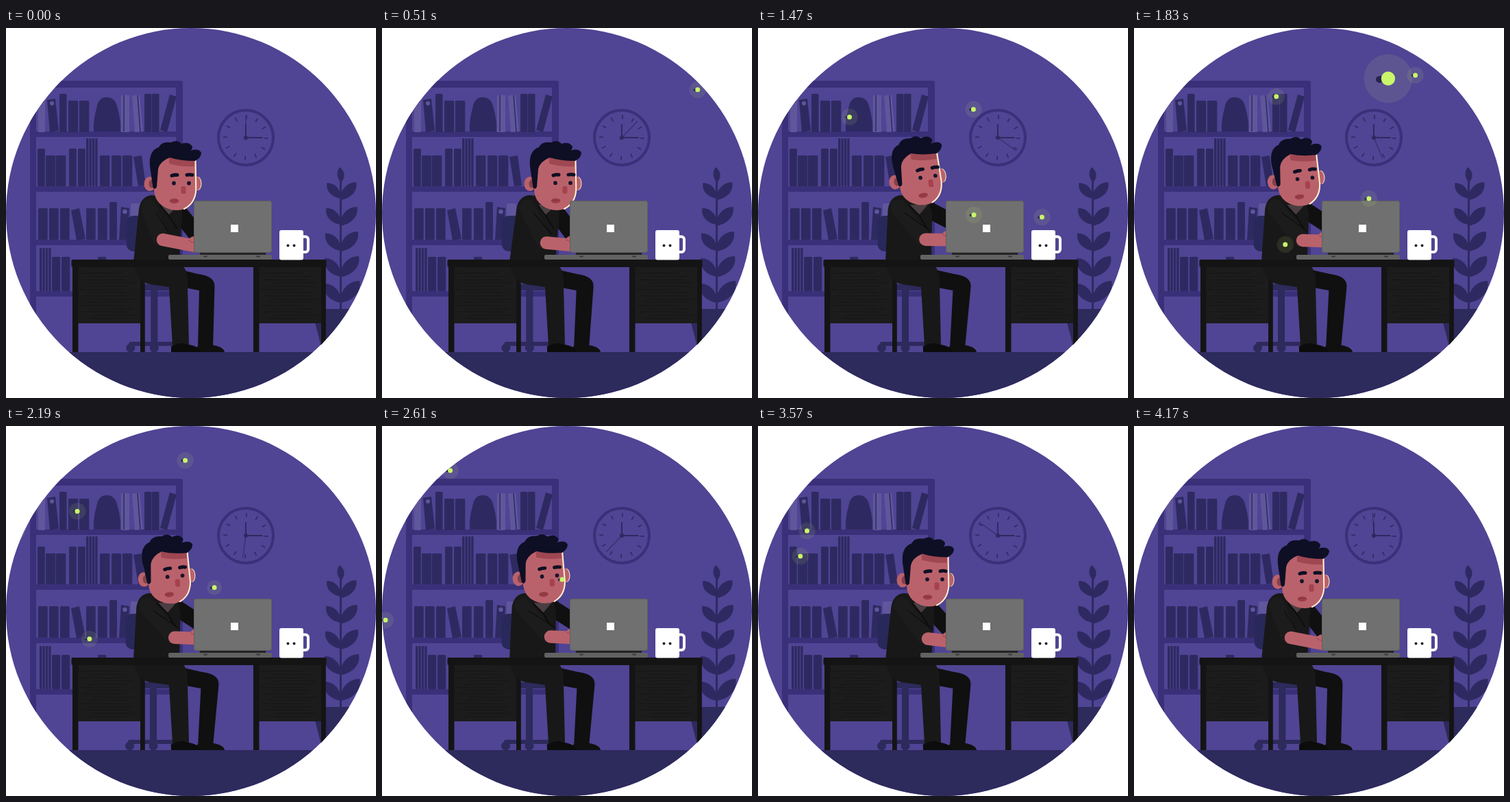
An HTML page with a canvas that plays this animation: 540x540 px, repeating every 4.2 s.

```html
<!DOCTYPE html>
<html lang="en">
<head>
<meta charset="utf-8">
<title>Night shift</title>
<style>
html, body { margin: 0; width: 100%; height: 100%; overflow: hidden; background: #fff; }
canvas { display: block; width: 540px; height: 540px; }
</style>
</head>
<body>
<canvas id="stage" width="540" height="540"></canvas>
<script>
const ctx = document.getElementById('stage').getContext('2d');
const LOOP = 4200;
const C = {
  wall: '#504494', shelf: '#3a3079', book: '#2e2a61', pale: '#5f569b', floor: '#2d2a5c',
  desk: '#141414', panel: '#1c1c1c', cloth: '#181818', cloth2: '#101010',
  skin: '#ba626b', shade: '#9f4752', hair: '#0e0f24', rim: '#fff1d2',
  lid: '#6f706f', glow: '#c9f66a', halo: 'rgba(205,235,120,0.1)'
};

// Drawing helpers
function rect(x, y, w, h, color, r = 0) {
  ctx.fillStyle = color;
  ctx.beginPath();
  ctx.roundRect(x, y, w, h, r);
  ctx.fill();
}
function oval(x, y, rx, ry, color) {
  ctx.fillStyle = color;
  ctx.beginPath();
  ctx.ellipse(x, y, rx, ry, 0, 0, Math.PI * 2);
  ctx.fill();
}
const dot = (x, y, r, color) => oval(x, y, r, r, color);
function shape(d, color) {
  ctx.fillStyle = color;
  ctx.fill(new Path2D(d));
}
function line(d, w, color, cap = 'round') {
  ctx.strokeStyle = color;
  ctx.lineWidth = w;
  ctx.lineCap = cap;
  ctx.lineJoin = 'round';
  ctx.stroke(new Path2D(d));
}

// Smooth curve through rows of [time, ...values]
function curve(keys, time) {
  const t = Math.max(keys[0][0], Math.min(keys[keys.length - 1][0], time));
  let i = 0;
  while (i < keys.length - 2 && t >= keys[i + 1][0]) i++;
  const a = keys[i], b = keys[i + 1], p = keys[i - 1] || a, n = keys[i + 2] || b;
  const span = b[0] - a[0], u = (t - a[0]) / span;
  const u2 = u * u, u3 = u2 * u;
  return a.slice(1).map((v, k) => {
    const j = k + 1;
    const m0 = (b[j] - p[j]) / (b[0] - p[0]) * span;
    const m1 = (n[j] - a[j]) / (n[0] - a[0]) * span;
    return (2 * u3 - 3 * u2 + 1) * v + (u3 - 2 * u2 + u) * m0 +
      (3 * u2 - 2 * u3) * b[j] + (u3 - u2) * m1;
  });
}

// Upright books with their foot on a shelf
function books(base, top, w, ...xs) {
  for (const x of xs) rect(x, top, w, base - top, C.book, 1.5);
}
function strips(x, top, base) {
  for (let i = 0; i < 4; i++) rect(x + i * 4.4, top, 3.4, base - top, C.book, 1);
}

function bookcase() {
  rect(35, 77, 223, 10, C.shelf, 3);
  rect(35, 80, 9, 393, C.shelf);
  rect(248, 80, 10, 393, C.shelf);
  for (const y of [151, 231, 309, 384]) rect(40, y, 212, 8, C.shelf);

  rect(47, 105, 10, 47, C.pale, 1.5);
  rect(168, 98, 12, 54, C.pale, 1.5);
  books(152, 96, 10.5, 78, 202, 213);
  books(152, 106, 14.3, 91, 107);
  shape('M60 105L72 103L77 150L64 152Z', C.book);
  dot(67, 110, 3, C.pale);
  shape('M184 99L195 97L200 151L188 152Z', C.pale);
  line('M172 98V151M192 98L196 151', 1.5, C.book, 'butt');
  shape('M239 97L249 100L235 152L225 149Z', C.book);
  shape('M128 151Q127 134 132 118Q134 101 147 101Q160 101 163 118Q168 134 167 151Z', C.book);

  books(231, 176, 10.8, 46, 92, 105);
  books(231, 186, 14.3, 58, 73, 137, 154, 170);
  strips(117, 161, 231);
  shape('M186 188L198 186L204 230L193 231Z', C.book);

  books(309, 263, 13.7, 47, 63, 79, 117, 134);
  books(309, 254, 11, 151);
  rect(182, 256, 14, 53, C.pale, 1.5);
  shape('M95 266L107 263L116 308L103 310Z', C.book);
  shape('M168 261L180 263L178 309L165 309Z', C.book);
  dot(173.5, 268, 3.2, C.pale);

  books(384, 334, 12.2, 67, 81, 134);
  strips(49, 321, 384);
}

function clock(t) {
  ctx.save();
  ctx.translate(350, 160);
  ctx.strokeStyle = C.shelf;
  ctx.lineWidth = 4;
  ctx.beginPath();
  ctx.arc(0, 0, 40, 0, Math.PI * 2);
  ctx.stroke();
  for (let i = 0; i < 12; i++) {
    ctx.save();
    ctx.rotate(i * Math.PI / 6 + 0.03);
    line('M0 -27V-33', 1.6, C.book, 'butt');
    ctx.restore();
  }
  line('M0 0V-19M0 0H24', 2, C.book);
  dot(0, 0, 3, C.book);
  ctx.rotate(t / LOOP * Math.PI * 2);
  line('M0 4V-33', 1, C.book, 'butt');
  ctx.restore();
}

function leaf(x, y, len, side) {
  ctx.save();
  ctx.translate(x, y);
  ctx.scale(side * len, len);
  shape('M0 0C.55 -.1 .95 -.5 .85 -1C.3 -1 -.1 -.5 0 0Z', C.book);
  ctx.restore();
}
function plant() {
  line('M488.5 215V412', 3, C.book, 'butt');
  shape('M489 226Q479 214 487 203Q499 213 489 226Z', C.book);
  for (let i = 0; i < 5; i++) {
    leaf(488, 249 + i * 38, 23 + i * 1.3, -1);
    leaf(489, 251 + i * 37.5, 26 + i * 1.5, 1);
  }
  shape('M446 410H540V473H462Z', C.floor);
}

function chair(k) {
  const x = (1 - k) * 1.3;
  rect(174.5 + x, 274, 34, 52, '#29285a', 10);
  rect(196, 374, 44, 9, C.floor, 3);
  rect(210 + x, 378, 10, 84, C.floor);
  rect(178 + x, 458, 68, 6, C.floor, 3);
  for (const w of [180.5, 215, 247]) dot(w + x, 467, 6.5, C.floor);
}

function cabinet(x, w) {
  rect(x + 5, 345, w - 10, 86, C.panel);
  for (let i = 0; i < 15; i++) {
    const a = x + 10 + (i * 37 % 23), y = 358 + i * 4.7;
    line(`M${a} ${y}q30 ${i % 3 - 1} ${w - 44} 0`, 0.7, 'rgba(0,0,0,.4)');
  }
}
function desk() {
  cabinet(97, 105);
  cabinet(361, 106);
  for (const x of [97, 361]) rect(x, 345, 8.5, 128, C.desk);
  for (const x of [196, 460]) rect(x, 345, 6.8, 128, C.desk);
  rect(95.5, 338, 372, 11, C.desk, 2);
}

function legs(k) {
  const d = k * 6;
  shape(`M228 346L${280 + d} 359Q${305 + d} 362 ${304.5 + d} 377L302 468H280L${282 + d * 0.4} 383L235 374Z`, C.cloth2);
  shape('M279 473V465Q291 457 303 463Q318 466 319 473Z', C.cloth2);
  shape('M186 340L254 343Q266 352 265 374L267 464H243L238 378L210 374Q188 370 186 340Z', C.cloth);
  shape('M241 473V465Q254 457 266 462Q283 465 285 473Z', '#0c0c0c');
}

function body(s, far, ex, ey, hx, hy) {
  line(`M${247 + s} 262L${282 + far * 8} ${306 - far * 22}`, 24, C.cloth2);
  shape(`M186 342L${194 + s} 264Q${197 + s} 246 ${212 + s} 244L${244 + s} 246Q${256 + s} 254 ${257 + s * 0.7} 272L253 342Z`, C.cloth);
  shape(`M${226 + s} 258H${252 + s}L${237 + s * 0.5} 273Z`, '#4a3e43');
  line(`M${225 + s} 259L${237 + s * 0.5} 273L${249 + s * 0.6} 292`, 2, '#0d0d0d');
  line(`M${209 + s} 262L${ex - 4} ${ey - 3}`, 23, '#1c1c1c');
  line(`M${219 + s} 270L${ex + 7} ${ey - 13}`, 1.2, '#0d0d0d');
  line(`M${ex} ${ey}L${hx} ${hy}`, 18.5, C.skin);
  oval(hx, hy - 5, 10, 9, C.skin);
  line(`M${hx - 8} ${hy - 8}Q${hx - 3} ${hy - 4} ${hx + 4} ${hy - 4}`, 1.2, C.shade);
}

function head(x, y, turn, look) {
  ctx.save();
  ctx.translate(247 + x, 226 + y);
  ctx.rotate(turn * Math.PI / 180);
  ctx.translate(-247, -226);
  oval(280, 227, 5.5, 10, C.rim);
  oval(279, 227, 5.5, 10, C.skin);
  oval(210, 227.5, 8.5, 10.5, C.skin);
  oval(212.5, 227.5, 4, 6, '#84404c');
  shape('M215 188H277L278 236Q277 256 261 264Q249 268 237 264Q216 256 216 234Z', C.skin);
  shape('M238 189H275V202Q255 203 238 198Z', C.shade);
  line('M276.5 192L277.3 236Q276 256 260 264', 2, C.rim);
  shape('M214.5 233L210 202Q208 179 223 174Q227 165 241 167Q250 162 256 169Q267 165 272 173Q272 177 269 179Q281 175 285 182Q285 189 276 194Q254 194 239 189Q224 195 222 206L220 232Q217 237 214.5 233Z', C.hair);
  ctx.translate(look, -look * 0.15);
  line('M242 215.5Q246 214 250 214.5M264 214.5Q268 213.5 272 214.5', 5, C.hair);
  dot(245, 226.5, 2.9, '#17152a');
  dot(267, 226.5, 2.9, '#17152a');
  rect(255.5, 231, 7, 11, '#a5424d', 2.5);
  oval(245.5, 252.5, 6.8, 3.7, '#9a3d48');
  line('M240 251.5Q246 253 251 251', 1, '#85333f');
  ctx.restore();
}

function laptop() {
  rect(283, 327, 96, 5, '#242424');
  rect(237, 331, 151, 7, '#626362', 2);
  for (const x of [288, 365]) rect(x, 332.5, 6, 2, '#3a3a3a', 1);
  rect(274, 252, 114, 76, '#5f605f', 3);
  rect(275, 253, 112, 74, C.lid, 3);
  rect(328, 287, 11, 11, '#fff');
}

function mug() {
  ctx.strokeStyle = '#fff';
  ctx.lineWidth = 4;
  ctx.beginPath();
  ctx.roundRect(428, 304.5, 13, 22.5, 4);
  ctx.stroke();
  rect(399, 295, 35, 43.5, '#fff', 3);
  dot(411.5, 317.5, 2, '#222');
  dot(420.5, 317.5, 2, '#222');
}

// A firefly crosses the room along a few [time, x, y] points
function firefly(t, size, dim, ...path) {
  if (t < path[0][0] || t > path[path.length - 1][0]) return;
  const [x, y] = curve(path, t);
  const fade = dim ? 1 - 0.85 * Math.exp(-(((t - dim) / 300) ** 2)) : 1;
  dot(x, y, 12.2 * size * fade, C.halo);
  oval(x - 4.2 * size, y + 0.4 * size, 2 * size, 1.8 * size, '#28244f');
  dot(x, y, 3.5 * size, C.glow);
}
function fireflies(t) {
  firefly(t, 1, 0, [420, 486, 100], [510, 461, 90], [1050, 278, 108], [1830, 10, 150]);
  firefly(t, 1, 0, [720, 530, 178], [1050, 439, 157], [1830, 208, 100], [2520, 10, 160]);
  firefly(t, 1, 0, [700, 545, 222], [1050, 428, 211], [1830, 221, 316], [2680, -14, 280]);
  firefly(t, 1, 2610, [900, 554, 318], [1050, 513, 312], [1830, 343, 249], [2610, 263, 224],
    [3240, 134, 190], [3570, 62, 190], [3960, -14, 208]);
  firefly(t, 1, 0, [1640, 490, 104], [1830, 411, 69], [2220, 250, 50], [2610, 100, 65], [2700, 62, 74]);
  firefly(t, 2.9, 0, [1690, 520, 118], [1830, 372, 74], [1950, 245, 54], [2210, -25, 150]);
  firefly(t, 1, 0, [2730, 488, 100], [3240, 230, 128], [3570, 72, 153], [3740, -8, 184]);
}

// time, head x, y, turn, look, elbow x, y, hand y, far arm, knee
const rest = [0, 0, 0, 0, 229, 309, 318, 0, 0];
const pose = [
  [30, ...rest],
  [510, 6, 0, 0, 2, 240, 313.5, 317, 0, 0.7],
  [1050, -13, -8, -9, 5, 242, 307.5, 308, 1, 1],
  [1830, -7, -6, -5.5, 0.5, 246, 310, 311, 0.7, 1],
  [2610, -11, -7, -4, -0.5, 246, 307.5, 309, 0.7, 1],
  [3570, 1, -2.5, 0, 1, 248, 310.5, 314, 0.2, 1],
  [4170, ...rest]
];

function draw(t) {
  const [x, y, turn, look, ex, ey, hy, far, knee] = curve(pose, t);
  ctx.clearRect(0, 0, 540, 540);
  ctx.save();
  ctx.beginPath();
  ctx.arc(270, 270, 270, 0, Math.PI * 2);
  ctx.clip();
  rect(0, 0, 540, 540, C.wall);
  bookcase();
  clock(t);
  plant();
  rect(0, 473, 540, 67, C.floor);
  chair(knee);
  desk();
  legs(knee);
  body(x * 0.4, far, ex, ey, 275 + knee * 3, hy);
  head(x, y, turn, look);
  rect(180, 338, 100, 11, C.desk);
  laptop();
  mug();
  fireflies(t);
  ctx.restore();
}

const start = performance.now();
function tick() {
  draw((performance.now() - start) % LOOP);
  requestAnimationFrame(tick);
}
tick();
</script>
</body>
</html>
```
